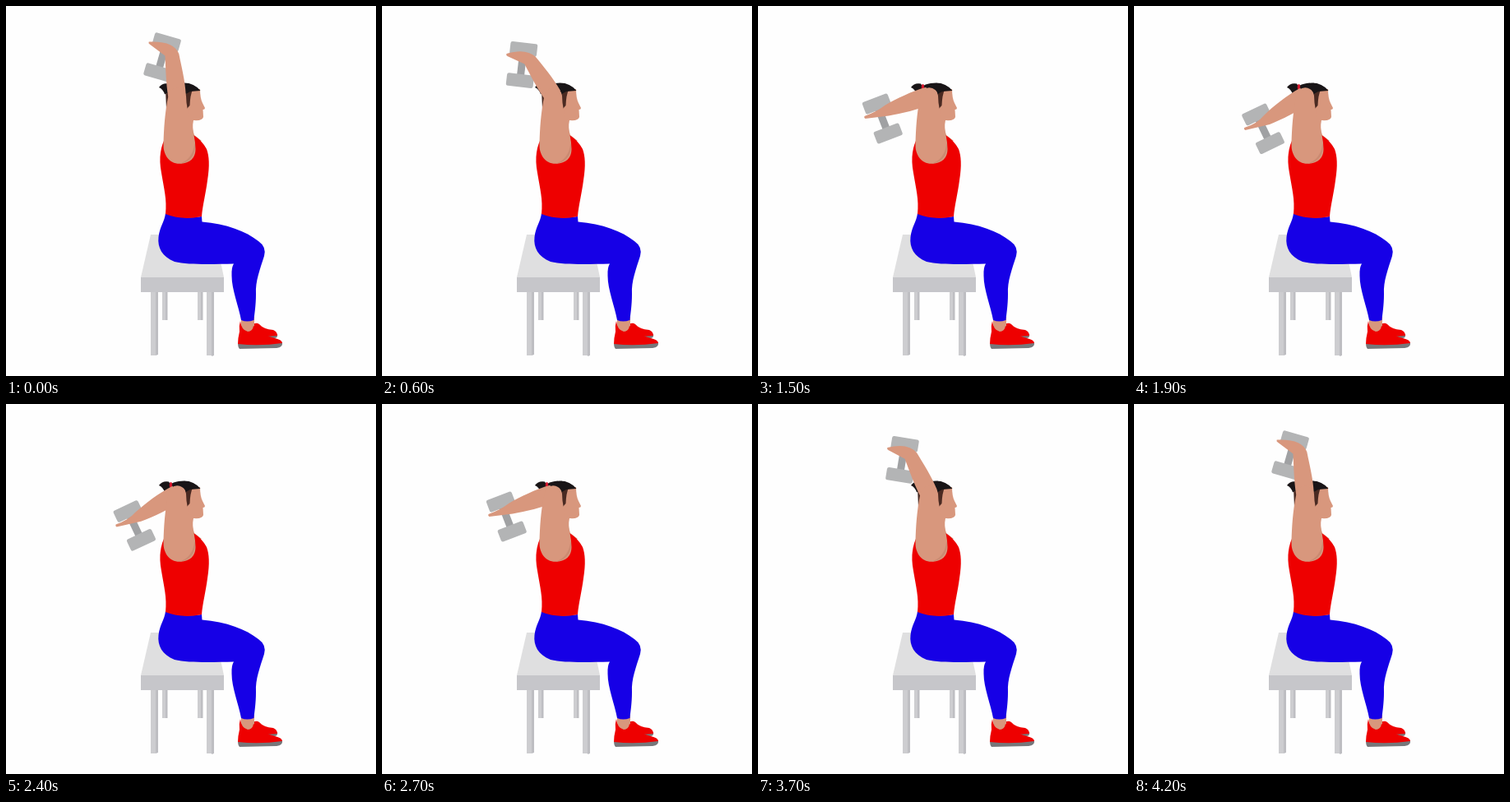
Animation of 450x450 px, one loop 4.3 s. Source, as an HTML page:

```html
<!DOCTYPE html>
<html lang="en">
<head>
<meta charset="utf-8">
<title>Seated triceps extension</title>
<style>
  html, body { margin: 0; width: 100%; height: 100%; overflow: hidden; background: #fefefe; }
  svg { display: block; width: 100vw; height: 100vh; }
  .skin { fill: #d8977d; }
  .red { fill: #ee0000; }
  .blue { fill: #1600e6; }
  .hair { fill: #191517; }
  .sole { fill: #77777a; }
  .leg { fill: #cdcdd0; }
  .edge { fill: #bebec2; }
</style>
</head>
<body>
<svg viewBox="0 0 450 450">
  <g id="bench">
    <path class="leg" d="M190 346h4v36h-4zM233 346h4v36h-4z"/>
    <path class="edge" d="M194 346h2.5v36h-2.5zM237 346h2.500v36h-2.500z"/>
    <path class="leg" d="M176 346h6v79h-6zM244 346h6v79h-6z"/>
    <path class="edge" d="M182 346h3v78l-3 1zM250 346h3v79l-3 1z"/>
    <path fill="#dfdfe0" d="M176 278H254L265 330H164Z"/>
    <path fill="#c6c6ca" d="M164 330H265V348H164Z"/>
  </g>

  <g id="legs">
    <path class="sole" d="M305 400L330 399Q331 404 326 404H305Z"/>
    <path class="red" d="M299 388Q304 384 308 387Q313 393 325 394Q330 396 330 401L303 403Z"/>
    <path class="skin" d="M286 378H302L302 394Q293 400 286 394Z"/>
    <path class="sole" d="M282 410L336 409Q337 415 329 416L284 417Q282 415 282 410Z"/>
    <path class="red" d="M285 383Q283 389 284 396Q282 404 282 411Q308 414 336 410Q336 406 327 404Q311 400 304 391L301 389Q300 396 294 396Q286 394 285 383Z"/>
    <path class="blue" d="M194 252Q214 260 238 256L238.500 262.500C268 265 292 274 307 286Q317 293 314 304C309 320 303 335 304 350C304 365 302 375 301.500 382Q293 385 286 382C283 365 274.500 345 274.500 328Q274 318 277 313.500C250 314 222 315 205 311C190 305 184 294 185.500 281C187 268 193 262 194 252Z"/>
  </g>

  <g id="body">
    <path class="skin" d="M200 106L226 101H236Q236 112 239 118L242 124Q242 126 239.500 126L240 135Q239 140 228 139Q226 148 229 157L238 164L205 175Z"/>
    <path class="red" d="M195 158C188 170 185.500 184 189 203C192 222 196 235 194 253Q214 261 238 256C239 243 243 228 245 212C248 194 247 182 244 174Q238 163 228 157Z"/>
    <path fill="#4a2a22" d="M194 102H227Q224 108 223.500 121L220 125H195Z"/>
    <path class="hair" d="M196 106Q196 96 210 94Q227 91 236.500 103L224 104L217 108Z"/>
    <path class="hair" d="M186 99Q190 93 198 94.500L204 104Q196 105 193 107.500Q191 101 186 99Z"/>
    <ellipse cx="200.500" cy="98.500" rx="1.700" ry="3.500" fill="#d3152b"/>
  </g>

  <g id="bell">
    <rect x="-4.500" y="-16" width="9" height="32" fill="#a0a1a3"/>
    <g fill="#b3b4b5">
      <rect x="-16.500" y="-27" width="33" height="15.500" rx="2.500"/>
      <rect x="-16.500" y="11.500" width="33" height="15.500" rx="2.500"/>
    </g>
  </g>
  <path id="forearm" class="skin"/>
  <path class="skin" d="M197.500 109A10.800 10.800 0 0 1 219 109C219 132 230.500 152 230.500 174C230.500 187 221 191.800 211 191.800C198 191.800 191 180 191.500 168C192 150 193 130 197.500 109Z"/>
  <path fill="#ca8b72" d="M229.500 166C232 182 222 191 211 191.800C222 188 228 180 229.500 166Z"/>
</svg>
<script>
const LOOP = 4300, STEP = 100, HALF = 2100;
const elbow = { x: 208, y: 109 };
const forearm = document.getElementById('forearm');
const bell = document.getElementById('bell');

// Point around the elbow, angle in degrees from straight up towards the back
function swing(angle, radius) {
  const a = angle * Math.PI / 180;
  return [elbow.x - radius * Math.sin(a), elbow.y - radius * Math.cos(a)];
}

// q runs from 0 (arm raised) to 1 (weight lowered)
function draw(q) {
  const bend = 7 + 116 * q, reach = 50 + 5 * q, half = 8.5 - 2 * q;
  const [dx, dy] = swing(bend, 1).map((v, i) => v - (i ? elbow.y : elbow.x));
  const at = (along, side) =>
    [elbow.x + dx * reach * along - dy * side, elbow.y + dy * reach * along + dx * side];
  const [tx, ty] = swing(28 + 91 * q, 73 + 11 * q);
  const knuckle = swing(3 + 118 * q, 67);
  forearm.setAttribute('d',
    `M${at(0, 10.8)}C${at(0.35, 12)} ${at(0.7, 9.5)} ${at(1, half)}` +
    `Q${knuckle} ${tx},${ty - 1}Q${tx - 1},${ty + 1} ${tx + 1},${ty + 2}` +
    `L${at(1, -half)}C${at(0.7, -9.5)} ${at(0.35, -11.5)} ${at(0, -10.8)}Z`);
  bell.setAttribute('transform',
    `translate(${swing(21 + 108 * q, 50 + 15 * q)}) rotate(${16 - 42 * q})`);
}

function tick() {
  const t = Math.floor(performance.now() % LOOP / STEP) * STEP;
  const x = t < 200 ? 0 : Math.min(t, 2 * HALF - t) / HALF;
  draw(1 - (1 - x * x) ** 3);
  requestAnimationFrame(tick);
}
tick();
</script>
</body>
</html>
```
